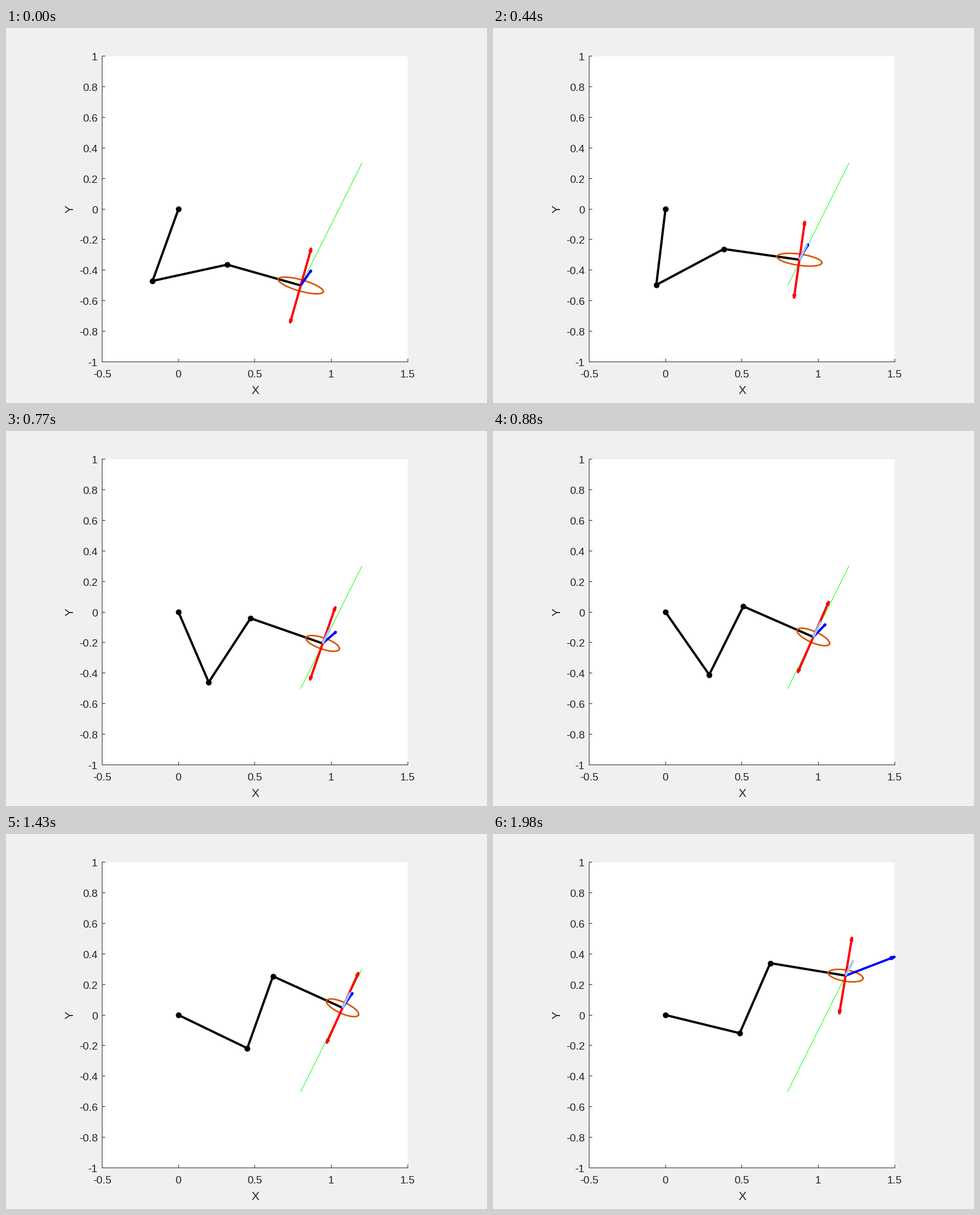
These frames come from a looping animation (848x661 px, 2.09 s). A matplotlib script:

```python
import numpy as np
import matplotlib.pyplot as plt
from matplotlib.animation import FuncAnimation
from matplotlib.patches import Rectangle

W, H, DPI = 848, 661, 100
STEPS, INTERVAL = 19, 110
SCALE = 269.4
ORIGIN = np.array([304.1, 319.1])
LINK = 0.5 * SCALE
PATH = np.array([[0.8, -0.5], [1.2, 0.3]])
INK = "#262626"

# step, tilt of the last link (deg), ellipse half length (px), force x and y (px)
KEYS = np.array([
    [0, 15.8, 41.2, 18, -26],
    [2, 5.0, 45.3, 13, -27],
    [5, 10.7, 36.3, 17, -26],
    [7, 19.2, 31.1, 23, -20],
    [10, 29.7, 31.0, 15, -27],
    [15, 18.6, 30.8, 21, -25],
    [18, 9.4, 31.0, 86, -33],
])


def px(points):
    """Data units to stage pixels."""
    return ORIGIN + np.asarray(points) * [SCALE, -SCALE]


def pt(pixels):
    return pixels * 72 / DPI


def smooth(k, xs, ys):
    """Monotone cubic through the points (xs, ys)."""
    h, d = np.diff(xs), np.diff(ys) / np.diff(xs)
    m = np.concatenate([d[:1], np.zeros(len(d) - 1), d[-1:]])
    same = d[:-1] * d[1:] > 0
    a, b = d[:-1][same], d[1:][same]
    m[1:-1][same] = 2 * a * b / (a + b)
    i = min(np.searchsorted(xs, k, side="right") - 1, len(h) - 1)
    t = (k - xs[i]) / h[i]
    return (ys[i] * (1 + 2 * t) * (1 - t) ** 2 + ys[i + 1] * t * t * (3 - 2 * t)
            + h[i] * t * (1 - t) * (m[i] * (1 - t) - m[i + 1] * t))


def hand(k):
    """Tip position; it lags left of the path while the arm swings through."""
    lag = 2.7 * np.exp(-((k - 5) / 2) ** 2)
    return px(PATH[0] + (PATH[1] - PATH[0]) * k / STEPS) - [lag, 0]


def elbow(a, b):
    """Lower joint of two equal links between a and b."""
    v = b - a
    dist = np.hypot(*v)
    rise = np.sqrt(max(LINK ** 2 - dist ** 2 / 4, 0))
    return (a + b) / 2 + rise * np.array([-v[1], v[0]]) / dist


def arrow(start, vec):
    """Shaft and narrow open head, sized by the shaft, as one polyline."""
    side = 0.016 * np.array([-vec[1], vec[0]])
    end = start + vec
    barb = end - 0.07 * vec
    return np.array([start, end, barb + side, end, barb - side, end])


plt.rcParams["font.family"] = "Liberation Sans"
fig = plt.figure(figsize=(W / DPI, H / DPI), dpi=DPI, facecolor="#f0f0f0")
ax = fig.add_axes([0, 0, 1, 1])
ax.set(xlim=(0, W), ylim=(H, 0))
ax.axis("off")

LEFT, BOTTOM = 169.5, 588.5
ax.add_patch(Rectangle((LEFT, 49.5), 538.8, 539, fc="white", ec="none", zorder=0))


def rule(xs, ys):
    ax.plot(xs, ys, color=INK, lw=pt(1), solid_capstyle="butt", snap=False, zorder=1)


def label(x, y, text, size=19, **kw):
    ax.text(x, y, text, fontsize=pt(size), color=INK, **kw)


rule([LEFT, LEFT], [49, 589])
rule([169, 709], [BOTTOM, BOTTOM])
for v in np.arange(-0.5, 1.6, 0.5):
    x = np.floor(px([v, 0])[0]) + 0.5
    rule([x, x], [BOTTOM, BOTTOM - 5.5])
    label(x - 0.5, 616.3, f"{v:g}", ha="center", va="baseline")
for v in np.arange(-5, 6) / 5:
    y = np.floor(px([0, v])[1]) + 0.5
    rule([LEFT, LEFT + 5.5], [y, y])
    label(161.5, y + 7.5, f"{v:g}", ha="right", va="baseline")
label(439.5, 644.8, "X", 21, ha="center", va="baseline")
label(113, 319.5, "Y", 21, ha="center", va="center", rotation=90)

ax.plot(*px(PATH).T, color="#00ff00", lw=pt(1), zorder=2)


def stroke(color, width, z, **kw):
    return ax.plot([], [], color=color, lw=pt(width), zorder=z,
                   solid_joinstyle="round", **kw)[0]


arm = stroke("black", 4, 3, solid_capstyle="butt")
joints = ax.plot([], [], "o", color="black", ms=pt(10.2), mew=0, zorder=3,
                 snap=False)[0]
ring = stroke("#d95300", 2.7, 4)
reds = [stroke("red", 4, 5, solid_capstyle="butt") for _ in range(2)]
force = stroke("blue", 4, 6, solid_capstyle="butt")
speed = stroke("#99ccff", 4, 7, solid_capstyle="butt")

theta = np.linspace(0, 2 * np.pi, 121)


def draw(k):
    tilt, half, fx, fy = (smooth(k, KEYS[:, 0], col) for col in KEYS[:, 1:].T)
    tip = hand(k)
    a = np.radians(tilt)
    along = np.array([np.cos(a), np.sin(a)])
    across = np.array([along[1], -along[0]])

    wrist = tip - LINK * along
    chain = np.array([ORIGIN, elbow(ORIGIN, wrist), wrist, tip])
    arm.set_data(*chain.T)
    joints.set_data(*chain[:3].T)

    ring.set_data(*(tip + half * np.outer(np.cos(theta), along)
                    + 9.9 * np.outer(np.sin(theta), across)).T)
    for line, sign in zip(reds, (1, -1)):
        line.set_data(*arrow(tip, sign * across * SCALE / 4).T)
    force.set_data(*arrow(tip, np.array([fx, fy])).T)
    speed.set_data(*np.array([tip, tip + SCALE * np.array([0.05, -0.1])]).T)
    speed.set_visible(k > 0)
    return arm, joints, ring, *reds, force, speed


anim = FuncAnimation(fig, draw, frames=STEPS, interval=INTERVAL,
                     repeat=True, repeat_delay=0, blit=False)
plt.show()
```
